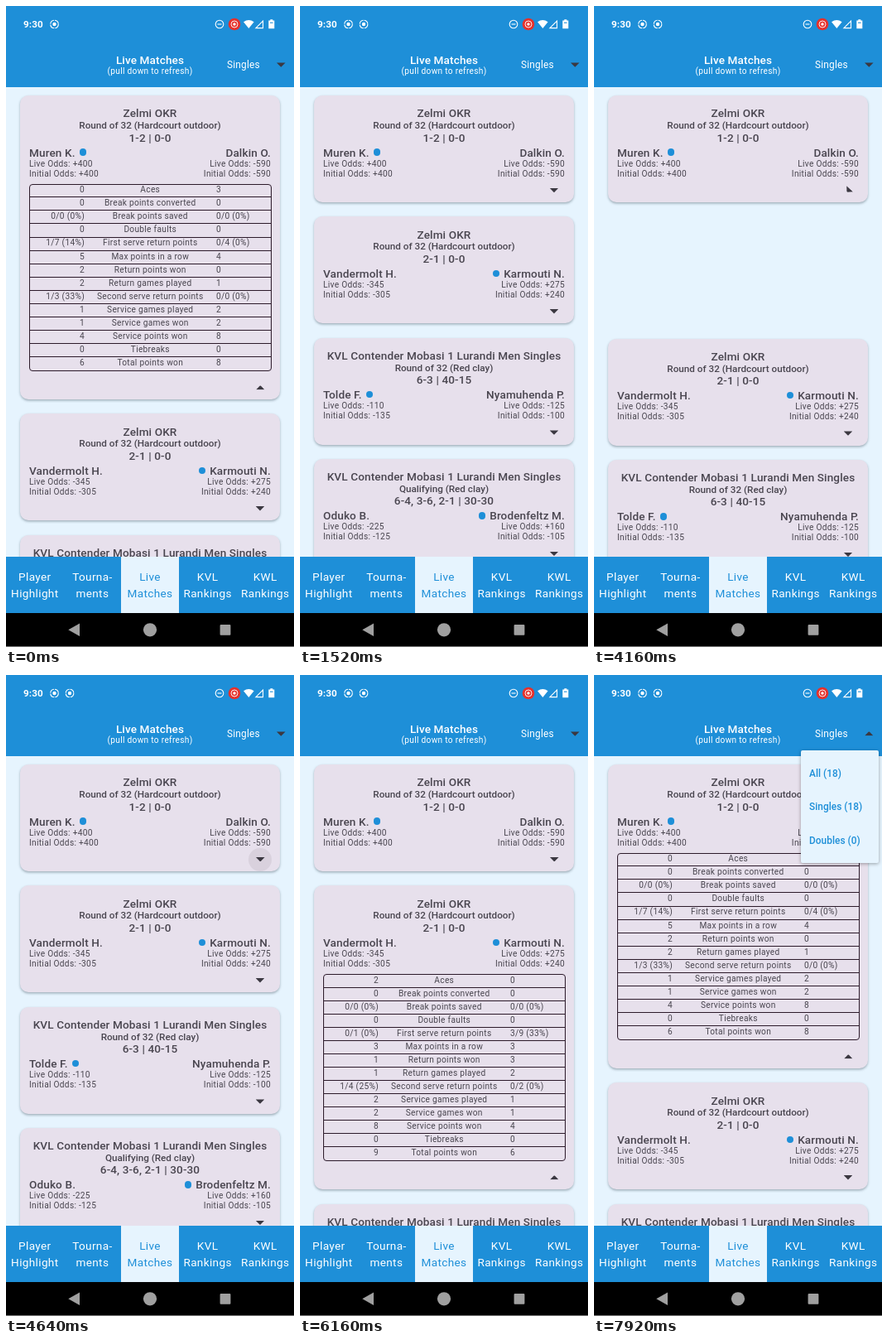
Animation, 348 px wide and 774 px high, one loop 8 s. Source, as an HTML page:

```html
<!DOCTYPE html>
<html lang="en">
<head>
<meta charset="utf-8">
<title>Live Matches</title>
<style>
  :root { --blue: #1e8fd8; --pale: #e6f4fe; --ink: #49454f; }
  * { box-sizing: border-box; }
  html, body { margin: 0; width: 100%; height: 100%; overflow: hidden; }
  body { position: relative; background: var(--pale); color: var(--ink); font: 10.16px/12px Roboto, sans-serif; letter-spacing: .3px; }
  div, svg { position: absolute; }
  .line { left: 0; right: 0; text-align: center; white-space: nowrap; transform: translateY(-50%); }
  .big { font-size: 13.55px; font-weight: 500; letter-spacing: .127px; line-height: 16px; }
  .mid { font-size: 11.7px; font-weight: 500; letter-spacing: 0; line-height: 14px; }

  #header { left: 0; top: 0; width: 348px; height: 97.5px; background: var(--blue); color: #fff; }
  #header svg { left: 0; top: 0; }
  #clock { left: 21px; right: auto; font-size: 11.7px; font-weight: 600; letter-spacing: .1px; }
  #filter { left: 267px; right: auto; font-size: 11.85px; letter-spacing: .21px; }

  #list { left: 0; top: 97.5px; width: 348px; height: 567.5px; overflow: hidden; }
  .slot { left: 13px; width: 322px; overflow: hidden; }
  .card { left: 4px; top: 4px; width: 314px; background: #e7e0ec; border-radius: 10px; box-shadow: 0 1.5px 3px rgba(30, 50, 60, .36); }
  .side { left: 11px; right: 11px; text-align: left; }
  .right { text-align: right; }
  .name { display: flex; align-items: center; gap: 5px; }
  .name.right { flex-direction: row-reverse; }
  .serving::after { content: ""; width: 8.6px; height: 8.6px; border-radius: 50%; background: var(--blue); }
  .table { left: 10.5px; top: 107px; width: 293.5px; height: 225.5px; border: 1.2px solid #2c1a2a; border-radius: 4px; overflow: hidden; }
  .row { left: 0; right: 0; height: 16.13px; border-bottom: 1.2px solid #2c1a2a; line-height: 14.6px; }
  .row:last-child { border: 0; }
  .row div { left: 0; right: 0; text-align: center; white-space: nowrap; }
  .row .l { right: 225px; text-align: right; }
  .row .r { left: 225.5px; text-align: left; }
  .ripple { left: 276px; width: 28px; height: 28px; margin-top: -14px; border-radius: 50%; background: rgba(73, 69, 79, .09); }
  .arrow { width: 10.6px; height: 5.4px; background: #3b3841; clip-path: polygon(0 0, 100% 0, 50% 100%); }
  .card .arrow { left: 284.7px; margin-top: -2.7px; }
  #header .arrow { left: 327px; top: 68.4px; }

  #menu { left: 250px; top: 91px; width: 94px; height: 136px; background: var(--pale); border-radius: 2px; box-shadow: 0 1px 4px rgba(0, 0, 0, .35); color: var(--blue); }
  #menu .line { left: 10px; text-align: left; font-size: 11.85px; letter-spacing: .05px; }

  #tabs { left: 0; top: 665px; width: 348px; height: 68px; background: var(--blue); color: #fff; }
  .tab { top: 0; width: 69.6px; height: 68px; padding-top: 13.5px; text-align: center; font-size: 13.55px; line-height: 20.3px; letter-spacing: .36px; }
  .tab.on { background: var(--pale); color: var(--blue); }
  #nav { left: 0; top: 733px; width: 348px; height: 41px; background: #000; border-bottom: 1px solid #777; }
</style>
</head>
<body>
<div id="list"></div>

<div id="header">
  <div id="clock" class="line" style="top:22px">9:30</div>
  <svg width="348" height="40" fill="none" stroke="#fff" stroke-width="1.1">
    <defs>
      <g id="cast"><circle r="4.8" stroke-dasharray="6.5 1.04" /><circle r="2.2" fill="#fff" stroke="none" /></g>
    </defs>
    <use href="#cast" x="58.5" y="22" />
    <use href="#cast" x="77" y="22" id="cast2" />
    <circle cx="258" cy="22" r="4.8" /><path d="M255.5 22h5" />
    <circle cx="276" cy="22" r="7.3" fill="#e5322d" stroke="none" />
    <circle cx="276" cy="22" r="4" stroke-width=".9" /><circle cx="276" cy="22" r="1.7" fill="#fff" stroke="none" />
    <path d="M287 19.3Q293.3 14.6 299.6 19.3L293.3 27Z" fill="#fff" stroke="none" />
    <path d="M310.5 18v8.6h-8.6Z" />
    <path d="M319.3 16.2h3v1.3h2v9.7h-7v-9.7h2Z" fill="#fff" stroke="none" />
    <path d="M319 20.2h3.6" stroke="#1e8fd8" />
  </svg>
  <div class="line big" style="top:64.5px">Live Matches</div>
  <div class="line" style="top:79px">(pull down to refresh)</div>
  <div id="filter" class="line" style="top:71px">Singles</div>
  <div class="arrow" id="filterArrow"></div>
</div>

<div id="menu">
  <div class="line mid" style="top:27.5px">All (18)</div>
  <div class="line mid" style="top:68px">Singles (18)</div>
  <div class="line mid" style="top:108.5px">Doubles (0)</div>
</div>

<div id="tabs"></div>
<div id="nav">
  <svg width="348" height="40" fill="#a0a0a0">
    <path d="M75.3 20.3L89 12.6V28Z" /><circle cx="174" cy="20.3" r="8.1" /><rect x="258.6" y="14" width="12.8" height="12.8" rx="1" />
  </svg>
</div>

<script>
const LOOP = 8000, STEP = 80;
const CARD_H = 129, EXTRA = 238, PITCH = 146.3;

const LABELS = ["Aces", "Break points converted", "Break points saved", "Double faults",
  "First serve return points", "Max points in a row", "Return points won", "Return games played",
  "Second serve return points", "Service games played", "Service games won", "Service points won",
  "Tiebreaks", "Total points won"];

// serve: 0 = left player, 1 = right player
const MATCHES = [
  { event: "Zelmi OKR", round: "Round of 32 (Hardcourt outdoor)", score: "1-2 | 0-0", serve: 0,
    names: ["Muren K.", "Dalkin O."], odds: [["+400", "+400"], ["-590", "-590"]],
    stats: ["0|0|0/0 (0%)|0|1/7 (14%)|5|2|2|1/3 (33%)|1|1|4|0|6",
            "3|0|0/0 (0%)|0|0/4 (0%)|4|0|1|0/0 (0%)|2|2|8|0|8"] },
  { event: "Zelmi OKR", round: "Round of 32 (Hardcourt outdoor)", score: "2-1 | 0-0", serve: 1,
    names: ["Vandermolt H.", "Karmouti N."], odds: [["-345", "-305"], ["+275", "+240"]],
    stats: ["2|0|0/0 (0%)|0|0/1 (0%)|3|1|1|1/4 (25%)|2|2|8|0|9",
            "0|0|0/0 (0%)|0|3/9 (33%)|3|3|2|0/2 (0%)|1|1|4|0|6"] },
  { event: "KVL Contender Mobasi 1 Lurandi Men Singles", round: "Round of 32 (Red clay)", score: "6-3 | 40-15", serve: 0,
    names: ["Tolde F.", "Nyamuhenda P."], odds: [["-110", "-135"], ["-125", "-100"]] },
  { event: "KVL Contender Mobasi 1 Lurandi Men Singles", round: "Qualifying (Red clay)", score: "6-4, 3-6, 2-1 | 30-30", serve: 1,
    names: ["Oduko B.", "Brodenfeltz M."], odds: [["-225", "-125"], ["+160", "-105"]] },
];

const TOGGLES = [
  { at: -LOOP, card: 0, open: true },
  { at: 400, card: 0, open: false, tap: true },
  { at: 3044, card: 0, open: true, tap: true },
  { at: 4099, card: 0, open: false, tap: true },
  { at: 5600, card: 1, open: true, tap: true },
  { at: 6960, card: 0, open: true, tap: true },
  { at: 6960, card: 1, open: false },
];
const MENU_AT = 7560;

const $ = id => document.getElementById(id);
const line = (y, cls, text) => `<div class="line ${cls}" style="top:${y}px">${text}</div>`;

function table([left, right]) {
  const l = left.split("|"), r = right.split("|");
  return `<div class="table">` + LABELS.map((label, i) =>
    `<div class="row" style="top:${i * 16.07 - .8}px"><div class="l">${l[i]}</div><div>${label}</div><div class="r">${r[i]}</div></div>`
  ).join("") + `</div>`;
}

function player(m, i) {
  const side = i ? "side right" : "side";
  const serving = m.serve === i ? "serving" : "";
  return line(68.6, `${side} big name ${serving}`, `<span>${m.names[i]}</span>`)
    + line(82.5, side, "Live Odds: " + m.odds[i][0])
    + line(94.5, side, "Initial Odds: " + m.odds[i][1]);
}

$("list").innerHTML = MATCHES.map(m => `<div class="slot"><div class="card">`
  + line(21.4, "big", m.event) + line(36, "mid", m.round) + line(50.6, "big", m.score)
  + player(m, 0) + player(m, 1) + (m.stats ? table(m.stats) : "")
  + `<div class="ripple"></div><div class="arrow"></div></div></div>`).join("");

$("tabs").innerHTML = ["Player Highlight", "Tourna- ments", "Live Matches", "KVL Rankings", "KWL Rankings"]
  .map((s, i) => `<div class="tab ${i === 2 ? "on" : ""}" style="left:${i * 69.6}px">${s.replace(" ", "<br>")}</div>`).join("");

const cards = [...document.querySelectorAll(".slot")].map(slot => {
  const get = sel => slot.querySelector(sel);
  return { slot, card: get(".card"), table: get(".table"), ripple: get(".ripple"), arrow: get(".arrow") };
});

const ramp = (t, from, to) => Math.min(1, Math.max(0, (t - from) / (to - from)));
const ease = p => p < .5 ? 2 * p * p : 1 - 2 * (1 - p) ** 2;

function rippleAlpha(t, i) {
  return Math.max(0, ...TOGGLES.filter(e => e.tap && e.card === i).map(({ at, open }) => open
    ? ramp(t, at - 640, at - 400) * (1 - ramp(t, at + 250, at + 500))
    : ramp(t, at + 80, at + 220) * (1 - ramp(t, at + 580, at + 800))));
}

function cardState(t, i) {
  const e = TOGGLES.filter(e => e.card === i && e.at <= t).pop();
  if (!e) return { open: false, grow: 0, turn: 0 };
  const quick = e.tap && !e.open;
  const p = quick ? ramp(t, e.at, e.at + 160) : ease(ramp(t, e.at, e.at + 300));
  const q = ramp(t, e.at, e.at + (quick ? 80 : 200));
  return { open: e.open, grow: e.open ? p : 1 - p, turn: e.open ? q : 1 - q };
}

function render(t) {
  let top = 6.5;
  cards.forEach((c, i) => {
    const { open, grow, turn } = cardState(t, i);
    const extra = open ? EXTRA : 0;
    c.slot.style.top = top + "px";
    c.slot.style.height = CARD_H + 8 + grow * EXTRA + "px";
    c.card.style.height = CARD_H + extra + "px";
    if (c.table) c.table.style.display = open ? "" : "none";
    c.arrow.style.top = c.ripple.style.top = 114.5 + extra + "px";
    c.arrow.style.transform = `rotate(${turn * 180}deg)`;
    c.ripple.style.opacity = rippleAlpha(t, i);
    top += PITCH + grow * EXTRA;
  });
  const shown = ramp(t, MENU_AT, MENU_AT + 120);
  $("menu").style.opacity = shown;
  $("filterArrow").style.transform = shown ? "rotate(180deg)" : "";
  $("cast2").style.opacity = t >= 80 ? 1 : 0;
}

const start = performance.now();
function tick() {
  // the screen refreshes 12.5 times per second
  const t = (performance.now() - start + 1) % LOOP;
  render(Math.floor(t / STEP) * STEP);
  requestAnimationFrame(tick);
}
tick();
</script>
</body>
</html>
```
